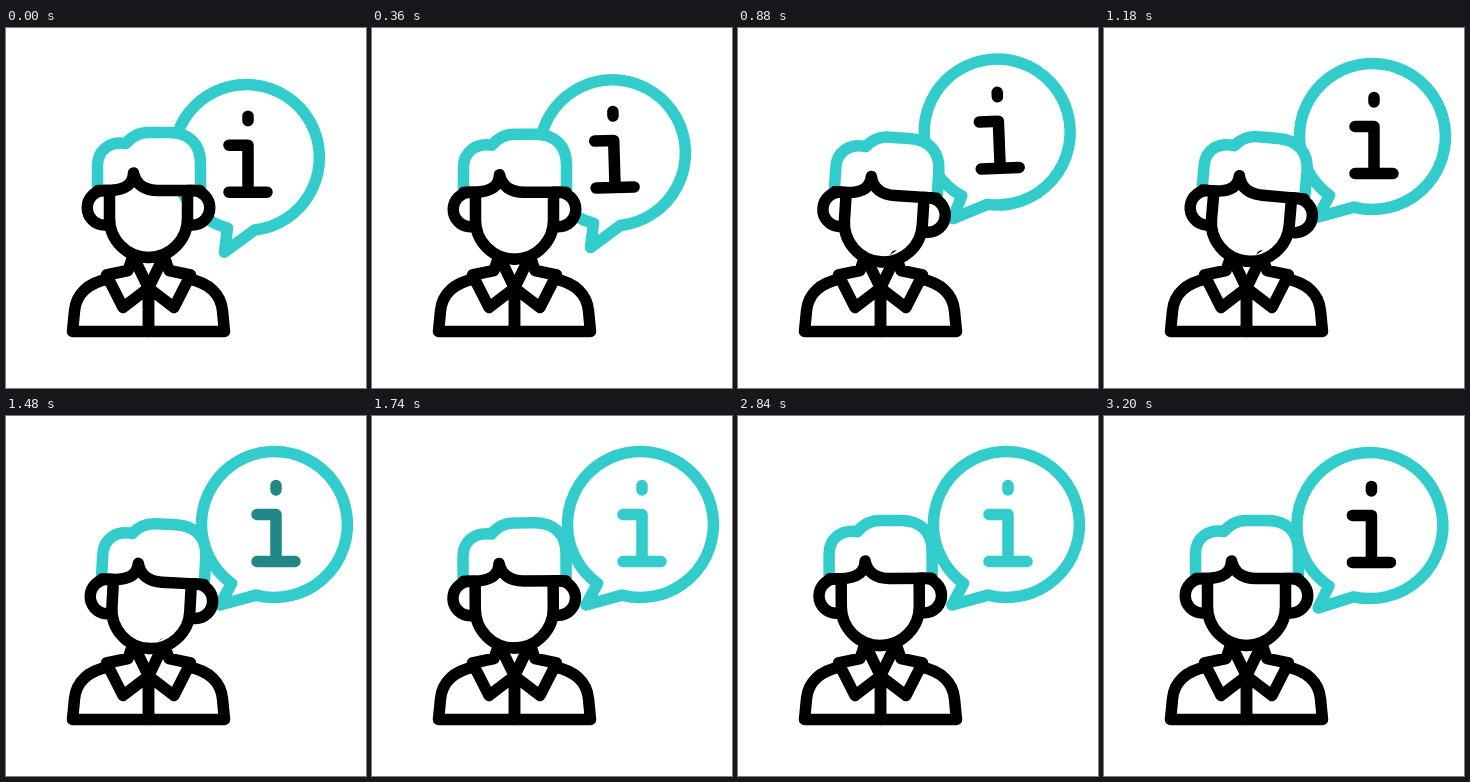
An HTML page that plays this animation: 360x360 px, repeating every 3220 ms.

```html
<!DOCTYPE html>
<html lang="en">
<head>
<meta charset="utf-8">
<title>Information assistant</title>
<style>
  html, body { margin: 0; height: 100%; overflow: hidden; background: #fff; }
  svg { display: block; width: 100vw; height: 100vh; }
  svg * { stroke-width: 11.5; stroke-linecap: round; stroke-linejoin: round; }
  .ink { stroke: #000; }
  .teal { stroke: #3cc; }
  .flip { transform: translateX(285px) scaleX(-1); }
</style>
</head>
<body>
<svg viewBox="0 0 360 360" fill="none">
  <path id="bubble" class="teal" d="M-18.5 70.6A73 73 0 1 0 -43 59L-54.5 80.5Z"/>
  <path id="info" d="M1.5-39V-34.5M-17.5-10H1.5V37M-17.5 37H20.5"/>
  <path id="torso" class="ink" d="M142.5 260V303.5H66.5L68.5 283C70 266 82 255 102 251M127 228L122 242.5L100.5 247L117 279.5L142.5 260Z"/>
  <use href="#torso" class="flip"/>
  <g id="head" fill="#fff">
    <path class="teal" stroke-linecap="butt" d="M91.5 160V138C91.5 122 104 113 120 115.5C126 108 133 104.5 143 104.5H163C183 104.5 194.5 116 194.5 135V160"/>
    <path id="side" class="ink" d="M142.5 229.5A39 39 0 0 1 103.5 190V162.5H98.5A17.25 17.25 0 0 0 98.5 197H103.5"/>
    <use href="#side" class="flip"/>
    <path class="ink" d="M92 162.5H103C117 162 127 158 127.5 145C130 157 139 162.5 152 162.5H194"/>
  </g>
</svg>
<script>
  const LOOP = 3220;
  const [bubble, info, head] = ['bubble', 'info', 'head'].map(id => document.getElementById(id));

  const place = (part, x, y, turn, pivot = '') =>
    part.setAttribute('transform', `translate(${x} ${y}) rotate(${turn} ${pivot})`);

  function draw(now) {
    const t = now % LOOP;
    const ramp = (from, to) => Math.min(1, Math.max(0, (t - from) / (to - from)));
    const ease = (from, to) => (1 - Math.cos(Math.PI * ramp(from, to))) / 2;

    // The bubble lifts past its height, settles while swinging out, then starts back.
    const back = ease(3060, 3400);
    const swing = ease(460, 1150) - back / 4;
    const spin = 21 * (swing - 1);
    const x = 240.5 + 28 * swing;
    const y = 129.5 - 27 * ease(220, 740) + 6 * ease(740, 1150) + 3 * back;
    place(bubble, x, y, spin);

    const lean = 5 * (ease(580, 1150) - ease(220, 580));
    const tint = ease(1300, 1600) - ease(2880, 3160);
    place(info, x, y + spin / 9, lean);
    info.setAttribute('stroke', `rgb(${51 * tint},${204 * tint},${204 * tint})`);

    // The head nods, then sways right and left as the nod wears off.
    const nod = 5 * (ease(220, 580) - ramp(580, 2860));
    const sway = 5 * Math.sin(2 * Math.PI * ramp(580, 2860));
    place(head, 0, nod, sway, '142.5 235');

    requestAnimationFrame(draw);
  }
  draw(performance.now());
</script>
</body>
</html>
```
